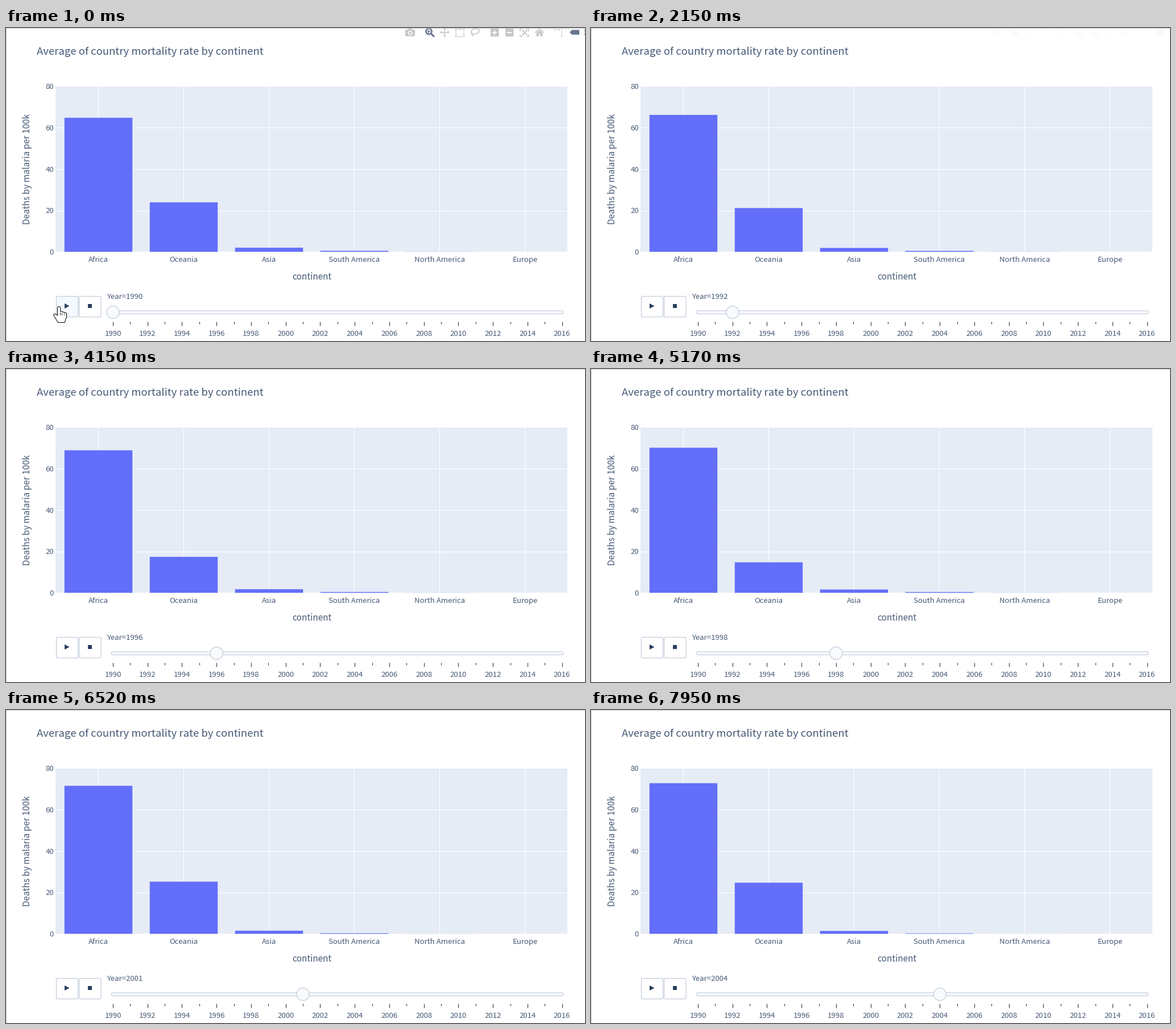
A matplotlib script for the animation above (8000 ms loop, 1018x550 px).

```python
import numpy as np
import matplotlib.pyplot as plt
from matplotlib.animation import FuncAnimation
from matplotlib.lines import Line2D
from matplotlib.patches import Circle, Ellipse, FancyBboxPatch, Polygon, Rectangle
from matplotlib.transforms import Affine2D

W, H, DPI = 1018, 550, 64
PT = 72 / DPI
LOOP, STEP = 8000, 40

INK, LABEL, PANEL, BAR = "#2a3f5f", "#475a77", "#e5ecf6", "#636efa"
BORDER, SOFT, HOVER = "#bec8d9", "#f8fafc", "#f4faff"
ICON, ICON_ACTIVE = "#c7c7c7", "#69768e"

LEFT, RIGHT, TOP, BASE = 87.5, 987.5, 102, 393.5
UNIT = (BASE - TOP) / 80
SLOT = (RIGHT - LEFT) / 6
NAMES = ["Africa", "Oceania", "Asia", "South America", "North America", "Europe"]

FIRST_STEP, YEAR_TIME, TRANSITION = 1340, 505, 330
CLICK = (420, 580)
CURSOR_EXIT = (1790, 1890)
TOOLBAR_FADE = (1880, 2180)
TIP_X, TIP_Y = 92, 489

plt.rcParams["font.family"] = ["Noto Sans CJK JP", "DejaVu Sans"]
fig = plt.figure(figsize=(W / DPI, H / DPI), dpi=DPI, facecolor="white")
ax = fig.add_axes([0, 0, 1, 1])
ax.set(xlim=(0, W), ylim=(H, 0))
ax.axis("off")
layers = iter(range(1, 1000))


def add(artist):
    artist.set_zorder(next(layers))
    return ax.add_artist(artist)


def rect(x, y, w, h, fill, edge="none", lw=0.0, **kw):
    return add(Rectangle((x, y), w, h, fc=fill, ec=edge, lw=lw * PT, **kw))


def rounded(x, y, w, h, r, fill, edge="none", lw=0.0):
    style = f"round,pad=0,rounding_size={r}"
    return add(FancyBboxPatch((x, y), w, h, boxstyle=style, fc=fill, ec=edge, lw=lw * PT))


def line(xs, ys, color, lw=1.0):
    return add(Line2D(xs, ys, color=color, lw=lw * PT, solid_capstyle="butt"))


def poly(points, fill, edge="none", lw=0.0):
    return add(Polygon(points, closed=True, fc=fill, ec=edge, lw=lw * PT, joinstyle="round"))


def circle(x, y, r, fill, edge="none", lw=0.0):
    return add(Circle((x, y), r, fc=fill, ec=edge, lw=lw * PT))


def text(x, y, s, px=13.2, ha="center", rotation=0):
    return ax.text(x, y, s, size=px * PT, color=LABEL, ha=ha, va="baseline",
                   rotation=rotation, rotation_mode="anchor", zorder=next(layers))


def year_x(n):
    return 188 + n * 30.37


def rates(n):
    """Deaths per 100k for each drawn continent, n years after 1990."""
    africa = 64.8 + 0.77 * n - 0.012 * n ** 2
    oceania = np.interp(n, [0, 4, 6, 8, 11, 13], [24, 18, 17.4, 14.7, 28, 24.8])
    return africa, oceania, 2.1 - 0.045 * n, 0.65 - 0.022 * n, max(0, 0.1 - 0.008 * n)


def draw_chart():
    rect(LEFT, TOP, RIGHT - LEFT, BASE - TOP, PANEL)
    for i, name in enumerate(NAMES):
        x = LEFT + SLOT * (i + 0.5)
        line([x, x], [TOP, BASE], "white", 1.1)
        text(x, 410.8, name)
    for value in range(0, 81, 20):
        y = BASE - value * UNIT
        line([LEFT, RIGHT], [y, y], "white", 1.1 if value else 2.2)
        text(84, y + 4.8, str(value), ha="right")
    text(54, 47.3, "Average of country mortality rate by continent", 18.5, "left")
    text(537.5, 441.7, "continent", 15.3)
    text(42.3, 248, "Deaths by malaria per 100k", 15.4, rotation=90)
    return [rect(LEFT + SLOT * (i + 0.1), BASE, SLOT * 0.8, 0, BAR, PANEL, 0.55, snap=False)
            for i in range(5)]


def draw_controls():
    play, _ = [rounded(x, 471.5, 38.2, 36.2, 2, fill, BORDER, 1.1)
               for x, fill in [(88.5, HOVER), (128.7, "white")]]
    poly([(103, 484), (111.5, 488.5), (103, 493)], INK)
    rect(144, 485, 7, 7, INK)
    rounded(185.5, 496.8, 794, 5.4, 2.2, SOFT, BORDER, 1.1)
    for n in range(27):
        major = n % 2 == 0
        line([year_x(n)] * 2, [516, 523 if major else 520], "#333333", 1.1)
        if major:
            text(year_x(n), 541, str(1990 + n))
    return play, circle(188, 499.5, 11, SOFT, BORDER, 1.1), text(177, 476.3, "", ha="left")


def draw_toolbar():
    directions = [(1, 0), (-1, 0), (0, 1), (0, -1)]
    corners = [(1, 1), (1, -1), (-1, 1), (-1, -1)]
    parts = [
        # camera
        rounded(702, 3, 17, 11.5, 1.5, ICON), rect(707, 1, 7, 3, ICON),
        circle(710.5, 8.5, 4, "white"), circle(710.5, 8.5, 2.4, ICON),
        # magnifier
        circle(743.5, 6, 5, "white", ICON_ACTIVE, 2.6),
        line([747, 753], [9.5, 15.5], ICON_ACTIVE, 3),
        # lasso
        add(Ellipse((825, 5.8), 14.5, 9, angle=-12, fill=False, ec=ICON, lw=1.7 * PT)),
        line([819.5, 818.5, 821, 820.5], [9, 11.5, 12.5, 15], ICON, 1.6),
        # home
        line([930, 938, 946], [8.5, 1.7, 8.5], ICON, 1.8),
        poly([(932.5, 8.8), (938, 4), (943.5, 8.8), (943.5, 14.5), (932.5, 14.5)], ICON),
        rect(936.6, 10, 2.8, 4.5, "white"),
        # hover tag
        poly([(991, 7.5), (995, 3.3), (1008, 3.3), (1008, 11.7), (995, 11.7)], ICON_ACTIVE),
    ]
    for dx, dy in directions:
        # magnifier plus, then pan arrows
        parts += [
            line([743.5, 743.5 + 2.5 * dx], [6, 6 + 2.5 * dy], ICON_ACTIVE, 1.6),
            line([771.5, 771.5 + 6 * dx], [7.5, 7.5 + 6 * dy], ICON, 1.6),
            poly([(771.5 + a * dx + b * dy, 7.5 + a * dy + b * dx)
                  for a, b in [(8.5, 0), (5, 3), (5, -3)]], ICON),
        ]
    for k in range(5):
        # dotted selection box
        parts += [rect(790 + 3.5 * k, y, 2, 2, ICON) for y in (1, 14)]
        parts += [rect(x, 1 + 3.25 * k, 2, 2, ICON) for x in (790, 804)]
    for x in (852, 878):
        # zoom in and zoom out
        parts += [rounded(x, 1, 14.5, 14, 1, ICON), rect(x + 3, 7, 8.5, 2, "white")]
    parts.append(rect(858.2, 3.7, 2, 8.6, "white"))
    for sx, sy in corners:
        # autoscale
        x, y = 912 + 7.5 * sx, 8 + 7 * sy
        parts += [line([x - 4.5 * sx, x, x], [y, y, y - 4.5 * sy], ICON, 1.5),
                  line([912, 912 + 4.5 * sx], [8, 8 + 4.5 * sy], ICON, 2)]
    for k in range(4):
        # spike lines
        parts += [rect(964 + 4 * k, 2, 2.3, 2.2, ICON), rect(976, 2 + 3.8 * k, 2.3, 2.2, ICON)]
    parts += [rect(1016.5, y, 2, 3, ICON) for y in (3, 9)]
    return parts


def draw_hand():
    """Pointing hand: outlines first, then fills, so the shapes merge."""
    palm = [(-8, 14.5), (-5, 13.8), (-1, 17), (13, 14), (13, 20), (11, 28), (0, 28), (-4, 22)]
    palm = [(TIP_X + x, TIP_Y + y) for x, y in palm]
    parts = []
    for edge, lw in [("black", 2), ("none", 0)]:
        for k in range(4):
            x, top = TIP_X - 1 + 3.6 * k, TIP_Y + (8.5 + k if k else 1)
            parts.append(rounded(x, top, 4.2, TIP_Y + 21 - top, 2, "white", edge, lw))
        parts.append(poly(palm, "white", edge, lw))
    for k in range(1, 4):
        parts.append(line([TIP_X - 0.7 + 3.6 * k] * 2, [TIP_Y + 10 + k, TIP_Y + 15], "black"))
    return parts


def progress(t, start, end):
    return min(max((t - start) / (end - start), 0), 1)


bars = draw_chart()
play, grip, year_label = draw_controls()
toolbar = draw_toolbar()
rect(0, 0, W, 1, "#c8c8c8")
rect(0, 0, 1, H, "#c8c8c8")
halo = circle(TIP_X, TIP_Y, 16, (1, 1, 0, 0.47))
hand = draw_hand()
hand_shift = Affine2D()
for part in hand:
    part.set_transform(hand_shift + ax.transData)


def update(frame):
    t = frame * STEP
    n = max(0, (t - FIRST_STEP) // YEAR_TIME + 1)
    start = FIRST_STEP + (n - 1) * YEAR_TIME
    p = progress(t, start, start + TRANSITION)
    for bar, old, new in zip(bars, rates(max(n - 1, 0)), rates(n)):
        height = (old + (new - old) * p) * UNIT
        bar.set_y(BASE - height)
        bar.set_height(height)
    grip.center = (year_x(n), 499.5)
    year_label.set_text(f"Year={1990 + n}")
    play.set_facecolor("white" if n else HOVER)

    opacity = (1 - progress(t, *TOOLBAR_FADE)) ** 2
    for part in toolbar:
        part.set_alpha(opacity)
        part.set_visible(opacity > 0)

    halo.set_visible(CLICK[0] <= t < CLICK[1])
    hand_shift.clear().translate(-43 * progress(t, *CURSOR_EXIT) ** 2, 0)
    for part in hand:
        part.set_visible(t < CURSOR_EXIT[1])


anim = FuncAnimation(fig, update, frames=LOOP // STEP, interval=STEP, repeat=True, repeat_delay=0)
plt.show()
```
